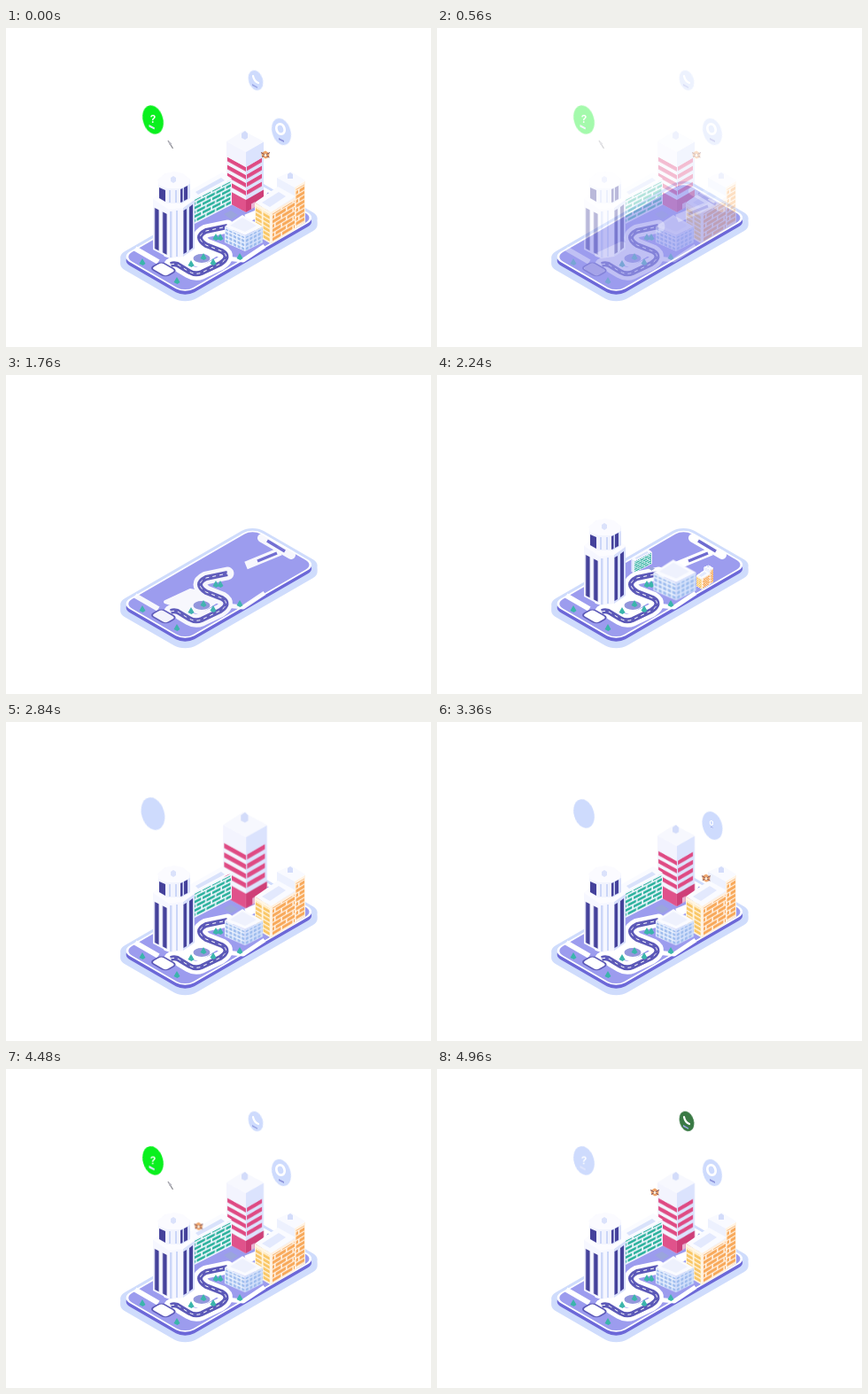
These frames come from a looping animation (480 px wide and 360 px high, 5 s). An HTML page without scripts:

```html
<!DOCTYPE html>
<html lang="en">
<head>
<meta charset="utf-8">
<title>City on a phone</title>
<style>
html, body { margin: 0; width: 100%; height: 100%; overflow: hidden; background: #fff; }
svg { display: block; width: 480px; height: 360px; }
:where(svg [class]) { animation: 5s linear infinite; }

.city { animation-name: fade; }
.streets { animation-name: streets; }
.tower { animation-name: tower; transform-origin: 189px 245px; }
.block { animation-name: block; transform-origin: 268.5px 233px; }
.green { animation-name: green; transform-origin: 232px 225px; }
.amber { animation-name: amber; transform-origin: 299px 241px; }
.pink { animation-name: pink; transform-origin: 270px 196px; }
.ask { animation-name: ask; transform-origin: 166px 103px; }
.ring { animation-name: ring; transform-origin: 311px 117px; }
.call { animation-name: call; transform-origin: 282px 59px; }
.ask-icon { animation-name: ask-icon; transform-origin: 166px 104px; }
.ring-icon { animation-name: ring-icon; transform-origin: 310px 114px; }
.call-icon { animation-name: call-icon; transform-origin: 282px 59px; }
.ask-fill { animation-name: ask-fill; }
.call-fill { animation-name: call-fill; }
.pointer { animation-name: pointer; }
.drone { animation-name: drone; }

@keyframes fade { 0%, 4.8% { opacity: 1 } 15% { opacity: 0 } 15.2%, 100% { opacity: 1 } }
@keyframes streets { 0%, 4.8% { opacity: 1 } 15%, 26% { opacity: 0 } 36%, 100% { opacity: 1 } }

/* Buildings and bubbles: empty, overshoot, settle */
@keyframes tower { 0%, 15% { transform: none } 15.1%, 38% { transform: scale(0) } 41.5% { transform: scale(1.15) } 43.6%, 100% { transform: none } }
@keyframes block { 0%, 15% { transform: none } 15.1%, 41% { transform: scale(0) } 44.8% { transform: scale(1.12) } 47%, 100% { transform: none } }
@keyframes green { 0%, 15% { transform: none } 15.1%, 43% { transform: scale(0) } 47.5% { transform: scale(1.15) } 49.6%, 100% { transform: none } }
@keyframes amber { 0%, 15% { transform: none } 15.1%, 43.5% { transform: scale(0) } 48% { transform: scale(1.15) } 50%, 100% { transform: none } }
@keyframes pink { 0%, 15% { transform: none } 15.1%, 52% { transform: scale(0) } 56.8% { transform: scale(1.18) } 59.4%, 100% { transform: none } }
@keyframes ask { 0%, 15% { transform: none } 15.1%, 53% { transform: scale(0) } 56.8% { transform: scale(1.13) } 59%, 100% { transform: none } }
@keyframes ring { 0%, 15% { transform: none } 15.1%, 62% { transform: scale(0) } 65.6% { transform: scale(1.16) } 68%, 100% { transform: none } }
@keyframes call { 0%, 15% { transform: none } 15.1%, 68.5% { transform: scale(0) } 72% { transform: scale(1.2) } 74.4%, 100% { transform: none } }
@keyframes ask-icon { 0%, 15% { transform: none } 15.1%, 76% { transform: scale(0) } 82%, 100% { transform: none } }
@keyframes ring-icon { 0%, 15% { transform: none } 15.1%, 65% { transform: scale(0) } 71%, 100% { transform: none } }
@keyframes call-icon { 0%, 15% { transform: none } 15.1%, 79% { transform: scale(0) } 84%, 100% { transform: none } }

@keyframes ask-fill {
  0%, 15% { fill: #0af01e } 15.1%, 79% { fill: #cedbfd }
  80.8% { fill: #7cee98 } 83%, 91% { fill: #0af01e } 94%, 100% { fill: #cedbfd }
}
@keyframes call-fill { 0%, 97% { fill: #cedbfd } 99.2%, 100% { fill: #3a7a45 } }
@keyframes pointer {
  0%, 15% { opacity: 1; transform: none }
  15.1%, 78% { opacity: 0; transform: translate(-8px, -10px) }
  79% { opacity: 1; transform: translate(-5px, -7px) }
  80.8% { transform: translate(-2px, -3px) }
  83%, 91% { opacity: 1; transform: none }
  93%, 100% { opacity: 0; transform: none }
}
@keyframes drone {
  0%, 15% { opacity: 1; transform: translate(293px, 143px) }
  15.1%, 63% { opacity: 0; transform: translate(327px, 164px) }
  65% { opacity: 1 }
  67.2% { transform: translate(304px, 176px) }
  74% { transform: translate(264px, 202px) }
  80.8% { transform: translate(225px, 215px) }
  88% { transform: translate(214px, 186px) }
  95% { transform: translate(229px, 149px) }
  99.2%, 100% { opacity: 1; transform: translate(246px, 139px) }
}
</style>
</head>
<body>
<svg viewBox="0 0 480 360">
  <defs>
    <pattern id="navy" width="9" height="80" patternUnits="userSpaceOnUse"><rect x="2" width="4.6" height="80" fill="#45429b"/></pattern>
    <pattern id="teal" width="11" height="9.6" patternUnits="userSpaceOnUse"><path d="M0 1.6H9.4M0 6.4H3M4.6 6.4H11" stroke="#27b09a" stroke-width="2.9"/></pattern>
    <pattern id="rose" y="17" width="30" height="9" patternUnits="userSpaceOnUse"><rect width="30" height="4.8" fill="#df4a83"/></pattern>
    <pattern id="sun" width="9" height="5" patternUnits="userSpaceOnUse"><rect x=".5" y=".6" width="7.4" height="3.5" fill="#f9c766"/></pattern>
    <pattern id="orange" width="13" height="10" patternUnits="userSpaceOnUse"><path d="M0 2H11.5M0 7H4M5.5 7H13" stroke="#f8a757" stroke-width="3.4"/></pattern>
    <pattern id="sky" width="4.6" height="4.5" patternUnits="userSpaceOnUse"><rect x=".6" y=".8" width="3.2" height="2.9" fill="#9dbcee"/></pattern>
    <path id="tree" d="M-3.5 2L0 -4L3.5 2L.5 4Z" fill="#3bb5ab"/>
    <rect id="plate" x="-5.5" y="-5.5" width="93" height="181" rx="14.5"/>
    <rect id="body" x="-1" y="-1" width="84" height="172" rx="12"/>
    <path id="road" d="M186 267Q192 265 197 269L207 275Q214 279 221 276L242 266Q254 258 244 252L226 245Q212 236 226 229L250 224"/>
  </defs>

  <!-- Phone -->
  <g fill="#cfdcfc">
    <use href="#plate" transform="matrix(.866 .5 -.866 .5 278.5 174.2)"/>
    <use href="#plate" transform="matrix(.866 .5 -.866 .5 278.5 178)"/>
    <use href="#plate" transform="matrix(.866 .5 -.866 .5 278.5 181)"/>
  </g>
  <use href="#body" fill="#6c68d8" transform="matrix(.866 .5 -.866 .5 278.5 177.2)"/>
  <g transform="matrix(.866 .5 -.866 .5 278.5 173.2)">
    <use href="#body" fill="#fff"/>
    <rect x="1" y="1" width="80" height="168" rx="10.5" fill="#9c9cee"/>
    <path d="M37 3.8h6" stroke="#fff" stroke-width="2.2" stroke-linecap="round"/>
    <rect x="32" y="151" width="18" height="12.5" rx="4" fill="#716edb"/>
  </g>

  <!-- Streets -->
  <g class="streets">
    <g fill="none" stroke-linejoin="round">
      <path d="M146 249L172 264" stroke="#fff" stroke-width="6"/>
      <path d="M289 184L322 203" stroke="#fff" stroke-width="10" stroke-linecap="round"/>
      <path d="M271 215L310 199" stroke="#fff" stroke-width="9"/>
      <path d="M295 187L315 199M284 210L306 201" stroke="#6f6bd0" stroke-width="3.5"/>
      <path d="M180 256L208 243L246 250L218 268Z" fill="#fff" stroke="#fff" stroke-width="4"/>
      <path d="M248 260L268 262L292 246" stroke="#fff" stroke-width="5"/>
      <use href="#road" stroke="#fff" stroke-width="15" stroke-linecap="round"/>
      <use href="#road" stroke="#5c59b8" stroke-width="6"/>
      <use href="#road" stroke="#fff" stroke-dasharray="4 4"/>
    </g>
    <ellipse cx="221" cy="260" rx="9.5" ry="5" fill="#9397dc"/>
    <rect x="31" y="150" width="20" height="14.5" rx="4.5" fill="#fff" stroke="#5c59b8" stroke-width="1.8" transform="matrix(.866 .5 -.866 .5 278.5 173.3)"/>
    <use href="#tree" x="154" y="264"/>
    <use href="#tree" x="193" y="285"/>
    <use href="#tree" x="209" y="266"/>
    <use href="#tree" x="223" y="258"/>
    <use href="#tree" x="234" y="264"/>
    <use href="#tree" x="237" y="236"/>
    <use href="#tree" x="242" y="236"/>
    <use href="#tree" x="264" y="258"/>
  </g>

  <g class="city">
    <g class="pink">
      <path d="M249 128L268 116L291 128L271 140Z" fill="#f7f8fe"/>
      <path d="M266 124v-5l4 -3l3 3v5l-3 2Z" fill="#d3dcfa"/>
      <g transform="matrix(1 .55 0 1 249 128)">
        <path d="M0 0H22V68H0Z" fill="#f3f4fe"/>
        <path d="M1 17H22V51H1Z" fill="url(#rose)"/>
        <path d="M0 54H22V68H0Z" fill="#e0528b"/>
      </g>
      <g transform="matrix(1 -.58 0 1 271 140)">
        <path d="M0 0H20V68H0Z" fill="#dbe3fd"/>
        <path d="M1 17H18V51H1Z" fill="url(#rose)"/>
        <path d="M0 54H20V68H0Z" fill="#cf3f78"/>
        <path d="M6 62h4v6h-4Z" fill="#e9b6d4"/>
      </g>
    </g>

    <g class="green">
      <path d="M205 185L244 163L255 170L211 193Z" fill="#fafbff"/>
      <path d="M214 185L243 169L247 172L217 188Z" fill="#d9e2fb"/>
      <path d="M205 185L211 193V222L205 218Z" fill="#e4eafd"/>
      <g transform="matrix(1 -.51 0 1 211 193)">
        <path d="M0 0H44V29H0Z" fill="#f1f6fe"/>
        <path d="M1 2H43V28H1Z" fill="url(#teal)"/>
      </g>
      <path d="M246 210L254 206L262 211L254 216Z" fill="#9aa5dc"/>
    </g>

    <g class="amber">
      <path d="M306 169L322 162L338 172L326 180Z" fill="#f9faff"/>
      <path d="M318 170v-5l3 -2l3 2v5Z" fill="#d3dcfa"/>
      <path d="M306 169L326 180V226L306 220Z" fill="#edf1fe"/>
      <g transform="matrix(1 -.6 0 1 326 180)">
        <path d="M0 0H12V47H0Z" fill="#fff2e2"/>
        <path d="M1.5 3H11V45H1.5Z" fill="url(#orange)"/>
      </g>
      <path d="M281 197L307 179L327 190L299 208Z" fill="#fafbff"/>
      <path d="M289 197L308 185L316 190L298 202Z" fill="#e3e9fd"/>
      <g transform="matrix(1 .58 0 1 281 197)">
        <path d="M0 0H18V36H0Z" fill="#fff6e4"/>
        <path d="M1 4H17V35H1Z" fill="url(#sun)"/>
      </g>
      <g transform="matrix(1 -.6 0 1 299 208)">
        <path d="M0 0H28V36H0Z" fill="#fff0e0"/>
        <path d="M2 3H27V34H2Z" fill="url(#orange)"/>
      </g>
    </g>

    <g class="tower">
      <path d="M166 193L174 187H205L213 193V249L200 258L185 260L166 250Z" fill="#f6f7ff"/>
      <path d="M200 203L213 194V249L200 258Z" fill="#d8e0fb"/>
      <g transform="matrix(1 .5 0 1 166 199)"><path d="M1 3H18V49H1Z" fill="url(#navy)"/></g>
      <path d="M185 207H187.5V259H185ZM192 206H194V258H192Z" fill="#cbd6f8"/>
      <path d="M200.5 206L204 204V253L200.5 255ZM207 202L211 199V248L207 251Z" fill="#45429b"/>
      <path d="M166 193L174 186H205L213 193L200 203L184 205Z" fill="#fcfcff"/>
      <path d="M172 171L180 164H199L208 171V192L198 198H182L172 192Z" fill="#f2f4fe"/>
      <path d="M197 181L208 176V192L198 198Z" fill="#d8e0fb"/>
      <path d="M173 180L180 183V196L173 192ZM197 182L199.5 181V196L197 197ZM201 180L205 178V193L201 195Z" fill="#45429b"/>
      <path d="M184 183H186V197H184ZM191 183H193V197H191Z" fill="#cbd6f8"/>
      <path d="M171 171L180 164L190 162L200 164L208 171L206 177L198 181H182L173 178Z" fill="#fbfbff"/>
      <path d="M186 173v-4l3 -2l3 2v4l-3 2Z" fill="#dbe2fb"/>
    </g>

    <g class="block">
      <path d="M247 224L267 211L290 224L270 234Z" fill="#fafbff"/>
      <path d="M253 223L267 214L283 223L270 230Z" fill="#eef1fd"/>
      <g transform="matrix(1 .44 0 1 247 224)">
        <path d="M0 0H23V18H0Z" fill="#eaf1fe"/>
        <path d="M.5 2H23V18H.5Z" fill="url(#sky)"/>
      </g>
      <g transform="matrix(1 -.5 0 1 270 234)">
        <path d="M0 0H20V18H0Z" fill="#d6e2fb"/>
        <path d="M.5 2H19.5V18H.5Z" fill="url(#sky)"/>
      </g>
    </g>

    <!-- Bubbles -->
    <g class="ask">
      <ellipse class="ask-fill" cx="166" cy="103.5" rx="11.3" ry="16.6" transform="rotate(-17 166 103.5)" fill="#cedbfd"/>
      <g class="ask-icon">
        <text x="166" y="107" text-anchor="middle" font-family="Inter, Arial, sans-serif" font-size="12" font-weight="600" fill="#fff">?</text>
        <path d="M161.5 109L168 112.5L167.5 114.5L161.5 111.5Z" fill="#dfe5fd"/>
      </g>
    </g>
    <g class="ring">
      <ellipse cx="311" cy="117" rx="10.3" ry="15.5" transform="rotate(-18 311 117)" fill="#cedbfd"/>
      <g class="ring-icon">
        <ellipse cx="310" cy="114" rx="4.5" ry="5.8" transform="rotate(-18 310 114)" fill="none" stroke="#fff" stroke-width="2.8"/>
        <path d="M308 124L314 127V129L308 126Z" fill="#8f96dc"/>
      </g>
    </g>
    <g class="call">
      <ellipse class="call-fill" cx="282" cy="59" rx="8" ry="11.6" transform="rotate(-18 282 59)" fill="#cedbfd"/>
      <g class="call-icon">
        <path d="M279 54Q280 60 285 62" fill="none" stroke="#fff" stroke-width="2.2" stroke-linecap="round"/>
        <path d="M278 63L284 66.5V68L278 65Z" fill="#9ba7e6"/>
      </g>
    </g>

    <g class="pointer">
      <path d="M183 127L188.5 136" stroke="#8a8a92" stroke-width="1.3"/>
      <path d="M183 127L187.5 130.5L184.5 132Z" fill="#b9b9c2"/>
    </g>

    <g class="drone">
      <path d="M-4.5 -2L0 -4.5L4.5 -1.5L4 3L0 4.5L-4 2Z" fill="#eda36a"/>
      <path d="M-5 -2.5L4.5 3M-4 2.5L5 -2.5" stroke="#7a4d56"/>
      <circle cy=".5" r="1.5" fill="#fff0dc"/>
    </g>
  </g>
</svg>
</body>
</html>
```
